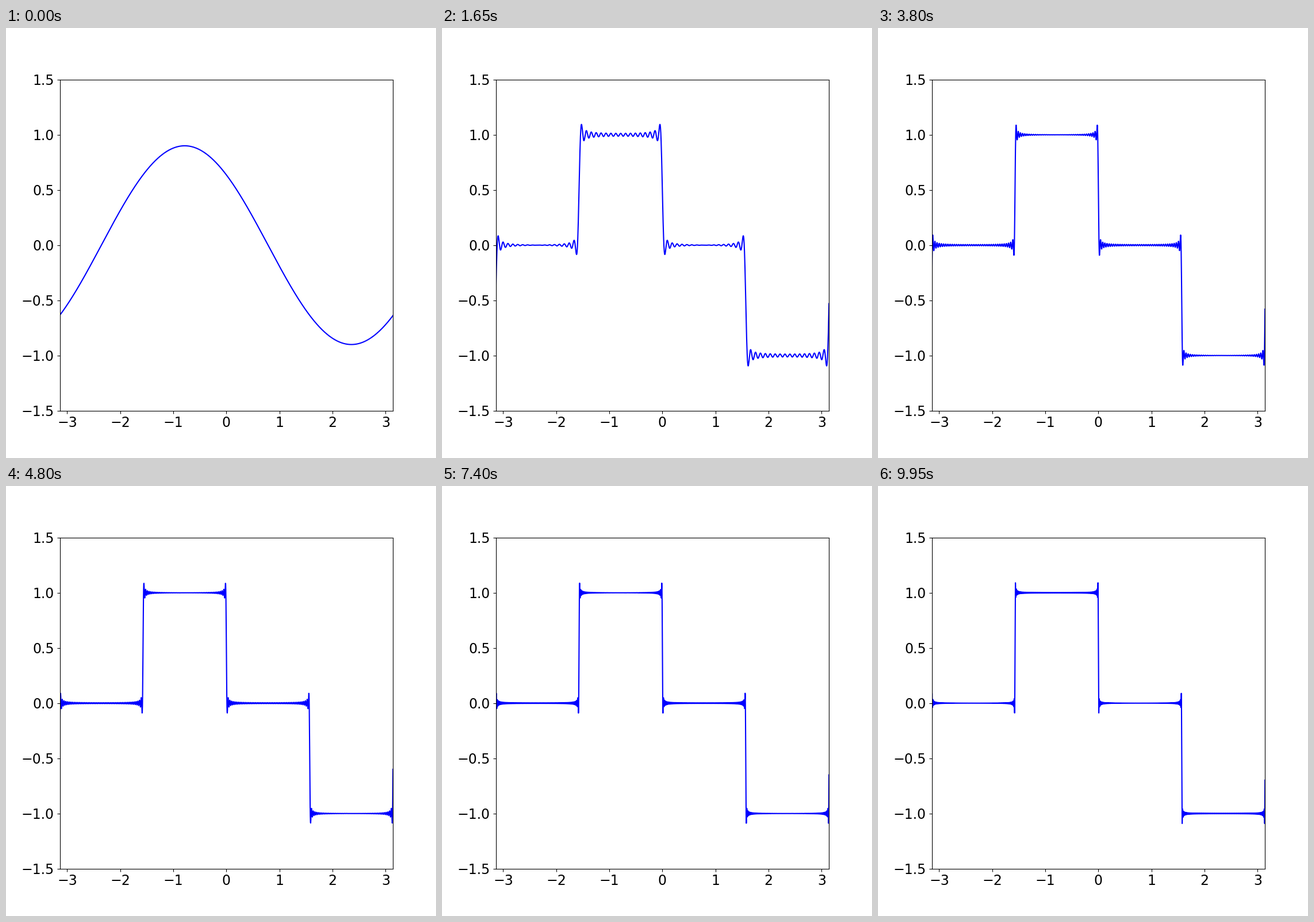
A matplotlib script for the animation above (10 s loop, 748x748 px).

```python
import numpy as np
import matplotlib.pyplot as plt
from matplotlib.animation import FuncAnimation

FRAMES = 200
INTERVAL = 50
X_MAX = 3.14

x = np.linspace(-X_MAX, X_MAX, 2000)


def harmonic(j):
    """Odd Fourier term number j of (sgn(cos x) - sgn(sin x)) / 2."""
    k = 2 * j + 1
    return 2 / (np.pi * k) * ((-1) ** j * np.cos(k * x) - np.sin(k * x))


partial_sums = np.cumsum([harmonic(j) for j in range(FRAMES)], axis=0)

plt.rcParams["font.family"] = "DejaVu Sans"
fig, ax = plt.subplots(figsize=(7.48, 7.48), dpi=100)
ax.set_xlim(-X_MAX, X_MAX)
ax.set_ylim(-1.5, 1.5)
ax.set_xticks(range(-3, 4))
ax.set_yticks(np.linspace(-1.5, 1.5, 7))
ax.tick_params(labelsize=17)
line, = ax.plot(x, partial_sums[0], color="blue", lw=1.5)


def update(i):
    line.set_ydata(partial_sums[i])
    return line,


anim = FuncAnimation(fig, update, frames=FRAMES, interval=INTERVAL,
                     repeat=True, repeat_delay=0)
plt.show()
```
